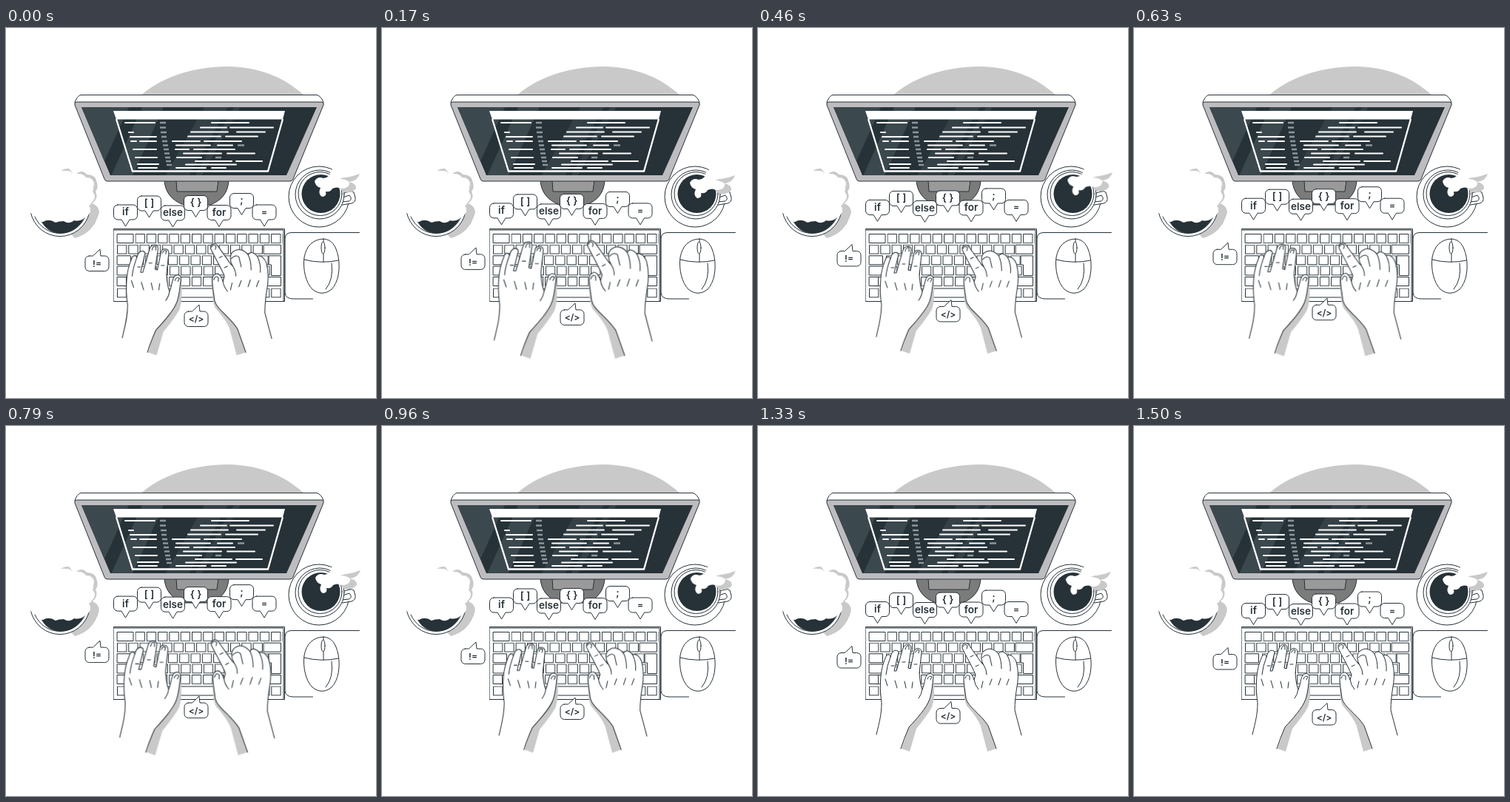
Write an HTML page without scripts that moves like this. It is 500 by 500 pixels and loops after 1540 ms.

```html
<!DOCTYPE html>
<html lang="en">
<head>
<meta charset="utf-8">
<title>Coding desk</title>
<style>
html, body { margin: 0; width: 100%; height: 100%; overflow: hidden; background: #fff; }
svg { display: block; width: 100vw; height: 100vh; }
.ink { fill: #fff; stroke: #263238; stroke-width: 1; stroke-linejoin: round; stroke-linecap: round; }
.line { fill: none; }
.shade { fill: #c9c9c9; }
.dark { fill: #263238; }
.code { fill: none; stroke: #fff; stroke-width: 2; stroke-linecap: round; }
.dim { stroke: #8b969b; stroke-width: 2.5; stroke-linecap: butt; }
text { font: 600 13.5px Inter, "Open Sans", sans-serif; fill: #263238; text-anchor: middle; }
.small { font-size: 12px; }
.float { animation: float 1540ms linear infinite; }
.hands { transform-origin: 255px 363px; animation: beat 1540ms linear infinite; }
.steam { animation: drift 1540ms ease-in-out infinite; }
@keyframes float {
  0% { transform: translateY(-.5px); }
  11% { transform: translateY(-2.6px); }
  21.4% { transform: translateY(-5px); }
  32% { transform: translateY(-7.6px); }
  41% { transform: translateY(-9.3px); }
  46% { transform: translateY(-9.7px); }
  51.3% { transform: translateY(-9.4px); }
  62% { transform: translateY(-7.6px); }
  76% { transform: translateY(-4.5px); }
  88% { transform: translateY(-1.6px); }
  97.4%, 100% { transform: translateY(0); }
}
@keyframes beat {
  0% { transform: scale(1.03); }
  5.5% { transform: scale(1.065); }
  11% { transform: scale(1.09); }
  16% { transform: scale(1.067); }
  21.4% { transform: scale(1.031); }
  29% { transform: scale(1); }
  35% { transform: scale(1.016); }
  41% { transform: scale(1.046); }
  46% { transform: scale(1.09); }
  51.3% { transform: scale(1.067); }
  60% { transform: scale(1.025); }
  71%, 100% { transform: scale(1); }
}
@keyframes drift {
  0%, 100% { transform: translate(0, 0); }
  11% { transform: translate(-1px, 2px); }
  21.4% { transform: translate(2px, -3px); }
  41% { transform: translate(0, 0); }
  51.3% { transform: translate(1px, -2px); }
  76% { transform: translate(-2px, 0); }
}
</style>
</head>
<body>
<svg viewBox="0 0 500 500">
<defs>
  <path id="down" class="ink" d="M5.5 0H26.5a5.5 5.5 0 0 1 5.5 5.5V14.5a5.5 5.5 0 0 1-5.5 5.5H21.5L16 29 10.5 20H5.5A5.5 5.5 0 0 1 0 14.5V5.5A5.5 5.5 0 0 1 5.5 0z"/>
  <path id="up" class="ink" d="M5.5 0H10.5L20-9 21 0H26.5a5.5 5.5 0 0 1 5.5 5.5V15a5.5 5.5 0 0 1-5.5 5.5H5.5A5.5 5.5 0 0 1 0 15V5.5A5.5 5.5 0 0 1 5.5 0z"/>
  <pattern id="keys" width="15.3" height="14.6" patternUnits="userSpaceOnUse">
    <rect class="ink" x=".5" y=".5" width="12.3" height="12"/>
  </pattern>
  <clipPath id="screen"><path d="M102 107H420L379 199H141z"/></clipPath>
</defs>
<rect width="500" height="500" fill="#fff"/>

<!-- Monitor -->
<path class="shade" d="M177 96C207 66 254 52 300 52C345 53 380 68 408 96z"/>
<path d="M214 206C215 222 224 233 240 239H276C292 233 300 222 301 206z" fill="#7b7b7b" stroke="#263238"/>
<path d="M230 206L231 221H285L287 206z" fill="#9a9a9a" stroke="#263238"/>
<path class="ink" d="M93 100.500Q96 92 101 90.500H420Q426 92 429 100.500z"/>
<path d="M95 100H427Q430 100.500 429 104L388 204Q387 207 383 207H137Q134 207 133 204L93 104Q92 100.500 95 100z" fill="#bdbcbf" stroke="#263238"/>
<path class="dark" d="M102 107H420L379 199H141z"/>
<g clip-path="url(#screen)" fill="#3b484e">
  <path d="M100 107H166L124 200H100zM184 107H213L171 200H142z"/>
  <path d="M268 107H300L247 200H215zM308 107H317L264 200H255z" opacity=".7"/>
</g>
<path d="M149 123L171 193.500H354L374 123" fill="none" stroke="#fff" stroke-width="2.300"/>
<path d="M145 112H377L374 123.500H149z" fill="#fff"/>
<path class="code" d="M161 128H201M278 128H328M263 134.500H298M303 134.500H361M166 141H172M168 147H203M250 140.500H300M312 140.500H350M246 146.500H290M297 146.500H340M169 153H176M181 153H203M225 153H262M268 153H318M230 158.500H276M286 158.500H306M172 164H203M229 164H247M254 164H309M240 169.500H291M299 169.500H336M175 175H204M231 175H264M256 180H305M311 180H346M178 184H206M243 184.500H311M179 189H204M230 189H270M278 189H297"/>
<path class="code dim" d="M208 128H216M208 134.500H216M209 141H217M210 147H217M211 153H218M212 158.500H219M213 164H220M214 169.500H221M215 175H222M216 180H223M217 185H224M313 158.500H322M283 175H291"/>

<!-- Cup under foam -->
<path class="shade" d="M112 236Q125 238 126 249Q119 277 93 284L80 270zM72 196q4-7 13-6l5 6zM96 196q8-5 13 2q11 0 13 8q4 9-1 15q5 10-6 17l-16-8z"/>
<path class="ink" d="M33.500 250A40.500 40.500 0 0 0 112.500 250z"/>
<path class="ink line" d="M39 255A37 37 0 0 0 107 255"/>
<path class="dark" d="M46 258Q55 277.500 74 277.500Q94 277.500 105 258L92 248H56z"/>
<g fill="#fff">
  <path d="M31 240Q32 210 60 202Q74 186 92 198Q106 194 111 207Q122 212 116 224Q119 236 112 240Q118 249 107 256Q100 262 92 260Q86 266 78 261Q71 261 67 263Q58 257 50 262Q44 262 43 256L33 250z"/>
  <circle cx="83" cy="201" r="8"/><circle cx="110" cy="211" r="9"/><circle cx="111" cy="228" r="9"/>
</g>

<!-- Coffee and steam -->
<circle class="ink" cx="423" cy="228" r="41"/>
<path class="ink" d="M448 240L467 237Q473 235 472 229L470 222Q468 220 464 221L450 225zM454 235L463 234Q467 233 466 229L464 226 455 229z"/>
<circle class="ink" cx="424" cy="225" r="33"/>
<circle class="ink" cx="424.500" cy="224" r="29.500"/>
<circle class="dark" cx="425.500" cy="224" r="26"/>
<g class="steam">
  <path class="shade" d="M446 203Q462 203 478 197Q475 207 463 208Q474 210 473 217Q467 224 456 222L448 214z"/>
  <path fill="#fff" d="M417 207Q421 200 429 203Q438 202 439 193L446 187 466 192Q463 201 451 204Q465 205 464 211Q462 217 453 217Q447 214 441 217Q439 222 432 221Q434 228 427 228Q421 224 425 216Q418 214 417 207z"/>
</g>

<!-- Mouse -->
<path class="ink line" d="M477.500 276.500H386Q377 276.500 377 285V358Q378 366 388 366H414.500"/>
<path class="ink" d="M429 285C440 285.500 446 294 449 309C452 326 449 344 440 353C432 360 422 360 414 353C405 344 401 326 403 310C406 294 415 285.500 429 285z"/>
<path class="ink line" d="M403 313Q426 319 449.500 314M429 285.500V316M440 318Q443 340 432 353"/>
<ellipse class="ink" cx="428.500" cy="297" rx="2.500" ry="8"/>

<!-- Keyboard -->
<path class="ink" d="M145.500 271.500H376.500V369.500H145.500z"/>
<path class="ink line" d="M146 273H375V369"/>
<g fill="url(#keys)">
  <rect width="199" height="14" transform="translate(174.500 278)"/>
  <rect width="198" height="14" transform="translate(150 292.700)"/>
  <rect width="182" height="14" transform="translate(173 307.300)"/>
  <rect width="182" height="14" transform="translate(175 321.500)"/>
  <rect width="183" height="14" transform="translate(159 336)"/>
  <rect width="76" height="14" transform="translate(150 351.500)"/>
  <rect width="30" height="14" transform="translate(343 351.500)"/>
</g>
<path class="ink" d="M150.500 278.500h21.500v12h-21.500zM348.500 293.200h23v12h-23zM150.500 307.800h18v12h-18zM150.500 322h20v12h-20zM150.500 336.500h12v12h-12zM355.500 307.800h16V334.500h-13V320h-3zM344.500 336.500h27v12h-27zM228 352h91v12h-91z"/>

<!-- Hands -->
<g class="hands">
  <path class="shade" d="M237 343Q240 366 235 380Q229 391 214 409L205 440 194 436 204 405 229 370zM278 343Q277 368 282 378Q300 398 302 410L310 440 322 436 310 400 284 370z"/>
  <path class="ink" d="M160 417C164 400 167 390 167 374C165 360 165 348 166 338C167 328 169 321 172 314C173 309 178 307 179 312L180 309C182 303 188 301 190 306L184 331 187 331 196 300C198 294 207 293 207 300L203 327 206 328 211 304C213 299 221 299 221 306L218 334Q219 350 222 356C225 350 225 341 228 337C231 333 237 334 237 339C236 348 235 360 232 369C228 381 214 396 204 407Q197 423 193 436"/>
  <path class="ink line" d="M179 312Q174 325 173 336M199 302Q200 296 204 297L204 302M213 306Q214 301 218 303L217 307M229 342Q231 336 235 339L233 343M172 342L175 351M185 344L188 354M198 345L200 354M209 346L208 354M222 356Q221 363 217 368M195 319h4M211 322h4M180 324h4"/>
  <path class="ink" d="M322 436L311 405C300 388 284 380 281 368C280 358 278 350 278 341C278 333 285 331 288 335Q291 339 292 343L294 336C288 322 281 311 276 300C275 294 281 291 285 296L302 320 305 323C300 315 301 306 307 303C313 299 320 302 325 308C328 303 333 305 337 310C342 308 347 313 349 319C352 330 352 340 350 352C348 364 347 374 347 384L356 418"/>
  <path class="ink line" d="M277 298Q279 293 283 297L282 301M280 341Q282 334 286 338L286 343M292 343Q293 350 298 356M305 323Q309 329 309 336M303 313Q309 307 313 311L316 324M325 308Q329 316 329 328M337 310Q342 320 341 331M304 345L302 354M316 342L313 350M328 341L325 350M339 342L336 350M287 312l4-2M294 325l4-2"/>
</g>

<!-- Speech bubbles -->
<g class="float">
  <g transform="translate(145.500 239.500)"><use href="#down"/><text x="16" y="14.500">if</text></g>
  <g transform="translate(177.500 227.500)"><use href="#down"/><text x="16" y="14">[ ]</text></g>
  <g transform="translate(209.500 240.500)"><use href="#down"/><text x="16" y="14.500">else</text></g>
  <g transform="translate(240.500 227)"><use href="#down"/><text x="16" y="14">{ }</text></g>
  <g transform="translate(272 240)"><use href="#down"/><text x="16" y="14.500">for</text></g>
  <g transform="translate(302.500 224)"><use href="#down"/><text x="16" y="14">;</text></g>
  <g transform="translate(333 239.500)"><use href="#down"/><text class="small" x="16" y="14">=</text></g>
  <g transform="translate(107 308.500)"><use href="#up"/><text class="small" x="16" y="15">!=</text></g>
  <g transform="translate(241 383.500)"><use href="#up"/><text class="small" x="16" y="14.500">&lt;/&gt;</text></g>
</g>
</svg>
</body>
</html>
```
